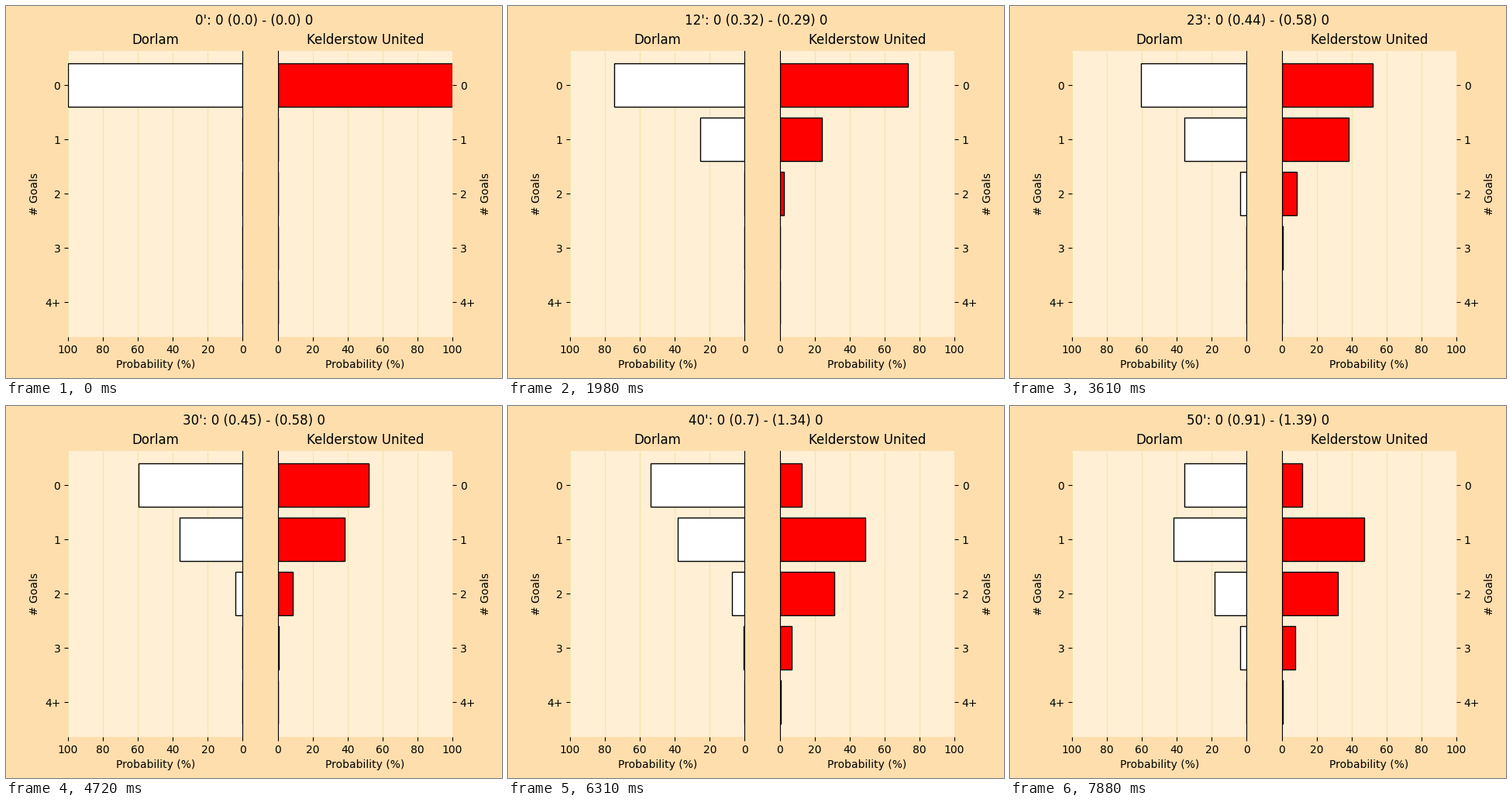
A matplotlib script that plays this animation: 640x480 px, repeating every 8 s.

```python
import numpy as np
import matplotlib.pyplot as plt
from matplotlib.animation import FuncAnimation

FRAMES, INTERVAL = 250, 32
STEPS = 5        # eased sub-steps per match minute
MINUTES = 51
GOALS = np.arange(5)

# shot chances by minute
HOME_SHOTS = {12: [0.318], 16: [0.06], 19: [0.058], 25: [0.01],
              40: [0.254], 45: [0.11, 0.103]}
AWAY_SHOTS = {2: [0.133], 4: [0.133], 9: [0.022], 14: [0.29],
              37: [0.76], 47: [0.05]}


def add_shot(dist, p):
    """Goal distribution after one more chance; the last bin is open-ended."""
    new = dist * (1 - p)
    new[1:] += dist[:-1] * p
    new[-1] += dist[-1] * p
    return new


def timeline(shots):
    """Goal distribution and expected goals at the end of every minute."""
    dist, xg = np.eye(5)[0], 0.0
    dists, totals = [], []
    for minute in range(MINUTES):
        for p in shots.get(minute, []):
            dist, xg = add_shot(dist, p), xg + p
        dists.append(100 * dist)
        totals.append(round(xg, 2))
    return dists, totals


def draw_side(ax, name, color, inner, outer):
    ax.set_facecolor("papayawhip")
    ax.set_axisbelow(True)
    ax.grid(axis="x", color="palegoldenrod")
    bars = ax.barh(GOALS, 0 * GOALS, color=color, edgecolor="black", linewidth=1)
    ax.set_title(name)
    ax.set_xlabel("Probability (%)")
    ax.set_ylabel("# Goals")
    ax.set_xlim((100, 0) if inner == "right" else (0, 100))
    ax.set_ylim(4.64, -0.64)
    ax.set_xticks(range(0, 101, 20))
    ax.set_yticks(GOALS, ["0", "1", "2", "3", "4+"])
    ax.yaxis.set_ticks_position(outer)
    ax.yaxis.set_label_position(outer)
    for side, spine in ax.spines.items():
        spine.set_visible(side == inner)
    return bars


fig, (left, right) = plt.subplots(1, 2, figsize=(6.4, 4.8), dpi=100,
                                  facecolor="navajowhite")
home_bars = draw_side(left, "Dorlam", "white", "right", "left")
away_bars = draw_side(right, "Kelderstow United", "red", "left", "right")
title = fig.suptitle("")

home, home_xg = timeline(HOME_SHOTS)
away, away_xg = timeline(AWAY_SHOTS)


def update(i):
    # the match clock runs slightly faster than the frame rate
    minute, step = divmod(int((i + 1.66) * 1.012), STEPS)
    blend = (step + 1) / STEPS
    for bars, dists in ((home_bars, home), (away_bars, away)):
        start, end = dists[max(minute - 1, 0)], dists[minute]
        for bar, width in zip(bars, start + (end - start) * blend):
            bar.set_width(width)
    title.set_text(f"{minute}': 0 ({home_xg[minute]}) - ({away_xg[minute]}) 0")
    return [title, *home_bars, *away_bars]


anim = FuncAnimation(fig, update, frames=FRAMES, interval=INTERVAL,
                     repeat=True, repeat_delay=0, blit=False)
plt.show()
```
